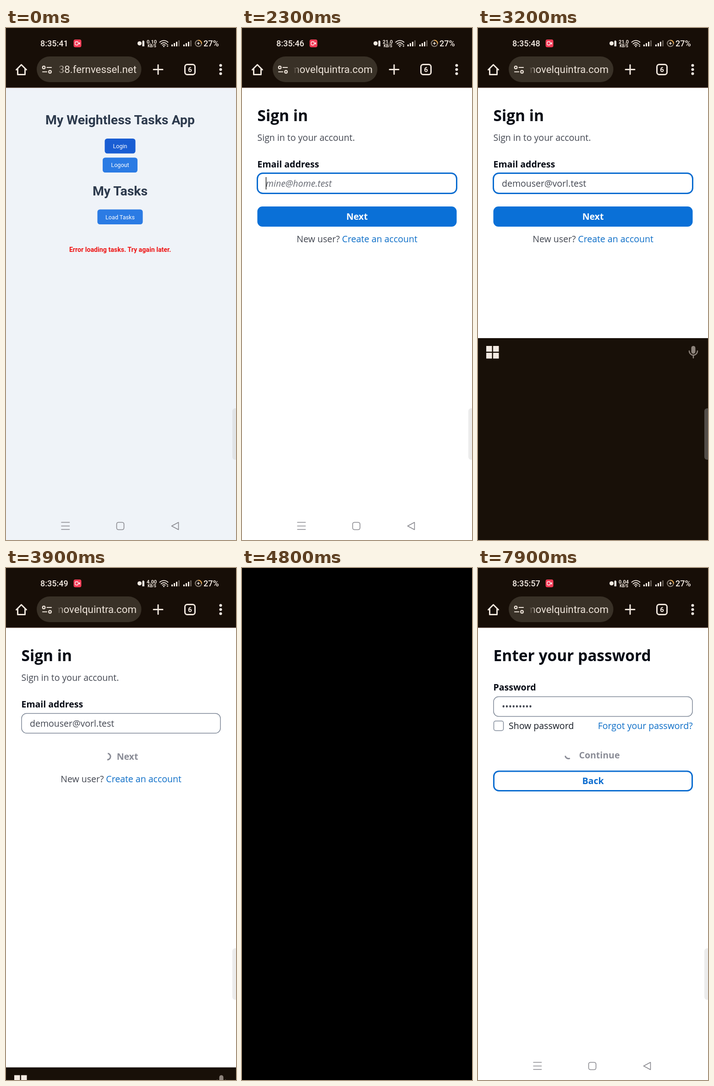
An HTML page for the animation above (8000 ms loop, 502 by 1116 pixels).

```html
<!DOCTYPE html>
<html lang="en">
<head>
<meta charset="utf-8">
<title>Sign-in recording</title>
<style>
  html, body { margin: 0; width: 100%; height: 100%; overflow: hidden; background: #fff; }
  svg { display: block; width: 100%; height: 100%; }
  text { font-family: Roboto, sans-serif; white-space: pre; }
  .mid { text-anchor: middle; }
  .end { text-anchor: end; }
  .line { fill: none; stroke-linecap: round; stroke-linejoin: round; }

  .app h1, .title { font-size: 28.4px; font-weight: 700; fill: #2d3a4d; }
  .pill { fill: #2b7be4; }
  .pill.hover { fill: #195dd3; }
  .label { font-size: 12.6px; fill: #fff; }
  .error { font-size: 14.2px; font-weight: 700; fill: #ee1414; }

  .form text { font: 19.5px "Open Sans", sans-serif; fill: #424650; }
  .form .head { font-size: 33.46px; font-weight: 700; fill: #050a14; }
  .form .bold { font-weight: 700; fill: #050a14; }
  .form .dark { fill: #161b24; }
  .form .hint { font-style: italic; fill: #656871; }
  .form .link { fill: #0b6dc7; }
  .form .white { font-weight: 700; fill: #fff; }
  .form .blue { font-weight: 700; fill: #0a6cd0; }
  .form .wait { font-weight: 700; fill: #8a8c96; }
  .field { fill: #fff; stroke: #7d8796; stroke-width: 1.5; }
  .ring { fill: #fff; stroke: #0a6cd0; stroke-width: 3; }
  .main { fill: #0a70d7; }
  .spin { fill: none; stroke: #8a8c96; stroke-width: 3; }

  .bar { fill: #f4ebe3; }
  .bar text { fill: #f4ebe3; font-weight: 500; font-size: 18px; }
  .bar .rate { font-size: 11px; font-weight: 700; }
  .bar .unit { font-size: 8.2px; font-weight: 700; }
  .bar .url { font-size: 22.3px; font-weight: 400; fill: #ece2d8; }
  .bar .count { font-size: 15px; font-weight: 700; }
  .icon { stroke: #f0e6dc; stroke-width: 3; }
  .nav { stroke: #87878d; stroke-width: 1.6; }
</style>
</head>
<body>
<svg viewBox="0 0 502 1116" preserveAspectRatio="none">
  <defs>
    <linearGradient id="fade">
      <stop offset=".35" stop-color="#393127"/>
      <stop offset="1" stop-color="#393127" stop-opacity="0"/>
    </linearGradient>
    <g id="signal">
      <path d="M0 36h3v4h-3zM5 33h3v7h-3zM10 30h3v10h-3z"/>
      <path d="M15 27h3v13h-3z" opacity=".35"/>
    </g>
  </defs>

  <rect width="502" height="1116" fill="#fff"/>

  <g data-on="0 1900">
    <rect width="502" height="1116" fill="#eff3f8"/>
    <text class="title mid" x="249" y="210">My Weightless Tasks App</text>
    <rect class="pill hover" x="215.500" y="241" width="67" height="32.500" rx="5.500"/>
    <text class="label mid" x="249" y="262">Login</text>
    <rect class="pill" x="211" y="282.500" width="76" height="32.500" rx="5.500"/>
    <text class="label mid" x="249" y="303">Logout</text>
    <text class="title mid" x="249" y="365">My Tasks</text>
    <rect class="pill" x="199.500" y="395.500" width="99" height="32.500" rx="5.500"/>
    <text class="label mid" x="249" y="416.500">Load Tasks</text>
    <text class="error mid" x="249" y="488">Error loading tasks. Try again later.</text>
  </g>

  <g class="form" data-on="2200 4100">
    <text class="head" x="33.500" y="203">Sign in</text>
    <text x="33.500" y="246">Sign in to your account.</text>
    <text class="bold" x="33.500" y="303.500">Email address</text>
    <rect class="field" x="34" y="317" width="434" height="43" rx="11"/>
    <rect class="ring" data-on="2200 3600" x="33.500" y="316.500" width="435" height="44" rx="12"/>
    <g data-on="2200 3200">
      <text class="hint" x="52" y="346">mine@home.test</text>
      <path d="M52.500 325v27" stroke="#111" stroke-width="1.400"/>
    </g>
    <text data-on="3200 4100" x="52" y="346">demouser@vorl.test</text>
    <g data-on="2200 3600">
      <rect class="main" x="33.500" y="389" width="435" height="44" rx="11"/>
      <text class="white mid" x="251" y="418">Next</text>
    </g>
    <g data-on="3600 4100">
      <path class="spin" data-spin="221 411 5 3900"/>
      <text class="wait mid" x="265" y="418">Next</text>
    </g>
    <text class="mid" x="251" y="467">New user? <tspan class="link">Create an account</tspan></text>
  </g>

  <g class="form" data-on="4100 8000">
    <text class="head" x="33.500" y="203">Enter your password</text>
    <text class="bold" x="33.500" y="267">Password</text>
    <rect class="field" x="34" y="280.500" width="434" height="43" rx="11"/>
    <text id="secret" x="52" y="309"></text>
    <rect class="field" x="34.500" y="333.500" width="21" height="21" rx="4"/>
    <text class="dark" x="67" y="350.500">Show password</text>
    <text class="link end" x="468.500" y="350.500">Forgot your password?</text>
    <g data-on="4100 4800">
      <rect class="main" x="33.500" y="386" width="435" height="44" rx="11"/>
      <text class="white mid" x="251" y="415">Continue</text>
    </g>
    <g data-on="7700 8000">
      <rect id="flash" x="33.500" y="386" width="435" height="45" fill="#aee1f8"/>
      <path class="spin" data-spin="197.500 408.500 265 7700"/>
      <text class="wait mid" x="265" y="415">Continue</text>
    </g>
    <rect class="ring" x="34.500" y="443" width="433" height="42.500" rx="11"/>
    <text class="blue mid" x="251" y="471">Back</text>
  </g>

  <rect data-on="2700 3600" y="676" width="502" height="378" fill="#131114"/>

  <g id="nav" class="nav line">
    <path d="M121 1077.500h17.500M121 1085.500h17.500M121 1093h17.500"/>
    <rect x="241.500" y="1077.500" width="16" height="16" rx="4"/>
    <path id="back" d="M361.500 1085.500 376.500 1077.500V1093.500Z"/>
  </g>

  <g id="keys">
    <rect width="502" height="440" fill="#181008"/>
    <path class="bar" d="M18 17h12.500v12.500h-12.500zM33 17h12.500v12.500h-12.500zM18 32h12.500v12.500h-12.500zM33 32h12.500v12.500h-12.500z"/>
    <rect x="465.500" y="17" width="9" height="17" rx="4.500" fill="#8d837b"/>
    <path class="line" d="M461 28a9 9 0 0 0 18 0M470 37v6" stroke="#8d837b" stroke-width="2.500"/>
  </g>

  <path d="M502 829h-2a6 6 0 0 0-6 6v100a6 6 0 0 0 6 6h2z" fill="#c7c7c7" opacity=".34"/>

  <g class="bar">
    <rect width="502" height="130" fill="#170e07"/>
    <rect y="129.500" width="502" height="1" fill="#6b5044"/>

    <text id="clock" x="75" y="40"></text>
    <rect x="147.500" y="25" width="17" height="17" rx="4" fill="#f23a55"/>
    <rect class="line" x="151" y="30" width="6.500" height="7" rx="1.500" stroke="#fff" stroke-width="1.300"/>
    <path d="M158 33.500 161.500 30.500V36.500Z" fill="#fff"/>

    <circle cx="291.500" cy="33.500" r="4.500"/>
    <path d="M298.500 27h2v1.500h1.500v11.500h-4.500v-11.500h1z"/>
    <text id="rate" class="rate mid" x="318" y="33.500"></text>
    <text class="unit mid" x="318.500" y="41.500">KB/S</text>
    <path class="line" d="M335.500 31a13 13 0 0 1 18 0M338.500 34.500a8.500 8.500 0 0 1 12 0M341.500 37.500a4.500 4.500 0 0 1 6 0" stroke="#f4ebe3" stroke-width="1.800"/>
    <circle cx="344.500" cy="40" r="1.500"/>
    <path d="M350.500 37.500l2-2.500 2 2.500zM350.500 39l2 2.500 2-2.500z"/>
    <use href="#signal" x="361"/>
    <use href="#signal" x="387"/>
    <circle class="line" cx="420" cy="33.500" r="6.800" stroke="#8d8379" stroke-width="2"/>
    <path class="line" d="M420 26.700a6.800 6.800 0 0 1 6.800 6.800" stroke="#e3a44b" stroke-width="2"/>
    <path class="line" d="M417.500 33.500h5M420 31v5" stroke="#f4ebe3" stroke-width="1.600"/>
    <text x="431" y="40">27%</text>

    <path class="icon line" d="M22.500 91 33.500 80 44.500 91M25.500 89V101.500H41.500V89"/>
    <rect x="67" y="62" width="228.500" height="56" rx="28" fill="#393127"/>
    <g class="icon line" style="stroke-width:2.200">
      <circle cx="82.500" cy="86" r="2.800"/>
      <circle cx="96" cy="95.500" r="2.800"/>
      <path d="M89.500 86h9.500M80 95.500h9"/>
    </g>
    <text class="url end" data-on="0 1900" x="285" y="98">38.fernvessel.net</text>
    <text class="url end" data-on="1900 8000" x="285" y="98">movelquintra.com</text>
    <rect x="103" y="70" width="26" height="40" fill="url(#fade)"/>
    <path class="icon line" d="M322 90.500h20M332 80.500v20"/>
    <rect class="icon line" x="390.500" y="79.500" width="22" height="22" rx="5"/>
    <text class="count mid" x="401.500" y="96">6</text>
    <circle cx="468.500" cy="81.500" r="3"/>
    <circle cx="468.500" cy="90.500" r="3"/>
    <circle cx="468.500" cy="99.500" r="3"/>
  </g>

  <rect data-on="4800 7700" width="502" height="1116" fill="#000"/>
</svg>

<script>
const LOOP = 8000, STEP = 100;
const byId = id => document.getElementById(id);
const clamp = x => Math.min(1, Math.max(0, x));
const easeOut = x => 1 - (1 - clamp(x)) ** 2;
const part = (t, from, to) => clamp((t - from) / (to - from));
// Last value whose start time has been reached.
const at = (t, list) => list.reduce((v, [from, value]) => t >= from ? value : v, "");

const numbers = s => s.split(" ").map(Number);
const spans = [...document.querySelectorAll("[data-on]")]
  .map(el => ({ el, range: numbers(el.dataset.on) }));
const spinners = [...document.querySelectorAll("[data-spin]")]
  .map(el => ({ el, spec: numbers(el.dataset.spin) }));

const seconds = [[0, 41], [200, 42], [700, 43], [1500, 44], [1800, 45], [2200, 46],
  [2700, 47], [3200, 48], [3700, 49], [4200, 50], [7700, 57]];
const rates = [[0, "0.10"], [1500, "21.0"], [3700, "4.00"], [7700, "0.04"]];

function arc(cx, cy, mid, length) {
  const r = 7;
  const point = deg => {
    const a = deg * Math.PI / 180;
    return `${cx + r * Math.cos(a)} ${cy + r * Math.sin(a)}`;
  };
  return `M${point(mid - length / 2)}A${r} ${r} 0 ${length > 180 ? 1 : 0} 1 ${point(mid + length / 2)}`;
}

function drawNav(t) {
  let opacity = 1;
  if (t >= 3600) opacity = part(t, 3900, 4200);
  if (t >= 7700) opacity = at(t, [[7700, .06], [7800, .6], [7900, 1]]);
  byId("nav").setAttribute("opacity", opacity);
  const turn = t < 3600 ? -90 * part(t, 2600, 2900) : 0;
  byId("back").setAttribute("transform", `rotate(${turn} 371 1085.5)`);
}

function draw(t) {
  for (const { el, range: [from, to] } of spans)
    el.style.display = t >= from && t < to ? "" : "none";

  for (const { el, spec: [cx, cy, mid, from] } of spinners) {
    const age = t - from;
    // The sign-in spinner is a quarter cycle further on at its reference time.
    const phase = age / 400 + (from < 4000 ? .25 : 0);
    el.setAttribute("d", arc(cx, cy, mid + age * 1.065, 170 + 60 * Math.cos(phase * 2 * Math.PI)));
  }

  byId("clock").textContent = "8:35:" + at(t, seconds);
  byId("rate").textContent = at(t, rates);
  byId("secret").textContent = t < 7700 ? "" : "•".repeat(8) + (t < 7900 ? "@" : "•");
  byId("flash").setAttribute("opacity", at(t, [[7700, 1], [7800, .4], [7900, 0]]));

  const shown = easeOut((t - 2700) / 400) - easeOut((t - 3600) / 400);
  byId("keys").setAttribute("transform", `translate(0 ${1116 - 440 * shown})`);
  drawNav(t);
}

const start = performance.now();
function tick() {
  const t = (performance.now() - start) % LOOP;
  draw(Math.floor(t / STEP) * STEP);
  requestAnimationFrame(tick);
}
tick();
</script>
</body>
</html>
```
